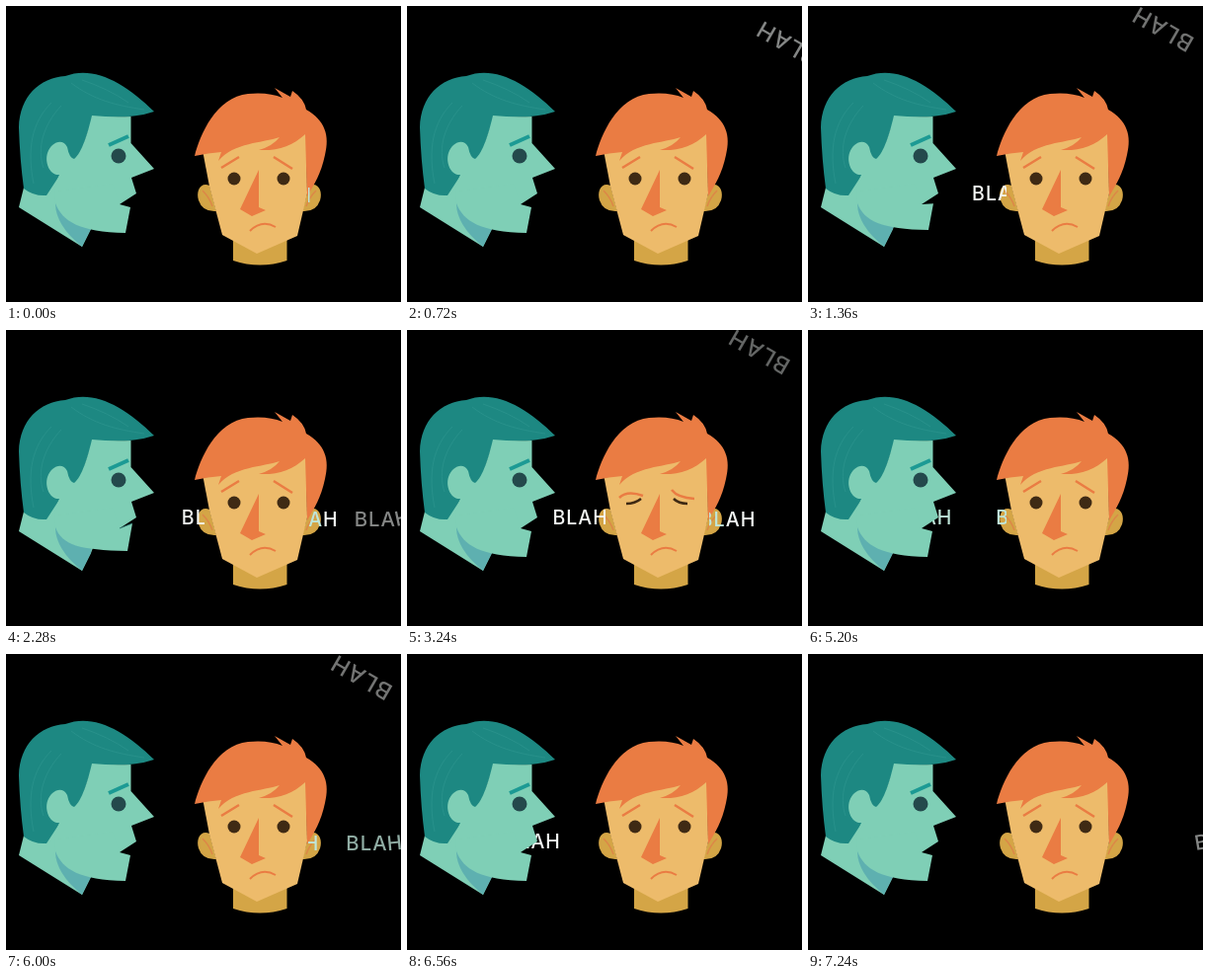
These frames come from a looping animation (400x300 px, 7.32 s). An HTML page with a canvas:

```html
<!DOCTYPE html>
<html lang="en">
<head>
<meta charset="utf-8">
<title>In one ear</title>
<style>
html, body { margin: 0; width: 100%; height: 100%; overflow: hidden; background: #000; }
canvas { display: block; width: 400px; height: 300px; }
</style>
</head>
<body>
<canvas id="stage" width="400" height="300"></canvas>
<script>
const ctx = document.getElementById('stage').getContext('2d');
const LOOP = 7320;
const TEAL = '#1d8882', MINT = '#7fcfb6', SHADE = '#5eb0b0';
const ORANGE = '#ea7c43', SKIN = '#edbb6b', TAN = '#d4a546', DARK = '#3f2a14';
const WHITE = '#f4f7f5', PALE = '#bfe6da';
const FONT = '500 19.5px Inter, "Open Sans", sans-serif';

const clamp = v => Math.max(0, Math.min(1, v));
const ramp = (v, a, b) => clamp((v - a) / (b - a));
const mix = (a, b, k) => a + (b - a) * k;

function fill(color, d) {
  ctx.fillStyle = color;
  ctx.fill(new Path2D(d));
}

function line(color, width, d) {
  ctx.strokeStyle = color;
  ctx.lineWidth = width;
  ctx.stroke(new Path2D(d));
}

function dot(color, x, y, r) {
  ctx.fillStyle = color;
  ctx.beginPath();
  ctx.arc(x, y, r, 0, Math.PI * 2);
  ctx.fill();
}

// ---- words -------------------------------------------------------------
// leave: time at the mouth, out: time at the far ear, speed: px per ms after it
const words = [
  { leave: 6480, out: 7318, speed: 0.2853, color: WHITE },
  { leave: 1018, out: 1943, speed: 0.302, color: WHITE },
  { leave: 1370, out: 2185, speed: 0.285, color: WHITE },
  { leave: 1700, out: 3064, speed: 0.25, color: WHITE },
  { leave: 2851, out: 4206, speed: 0.285, color: WHITE },
  { leave: 4152, out: 4640, speed: 0.2853, color: WHITE },
  { leave: 4750, out: 5673, speed: 0.285, color: PALE },
  { leave: 5150, out: 5978, speed: 0.35, color: PALE },
  { leave: 6040, out: 6710, speed: 0.27, color: WHITE }
];
const MOUTH = 129, EAR = 309, TOP = 697;
const BEND = 386.5, RADIUS = 78.6, TURN = Math.PI * 5 / 6, BASE = 199;

// Straight out of the ear, round the bend, then back up to the left.
function onPath(s) {
  if (s <= BEND) return { x: s, y: mix(197, BASE, ramp(s, 200, EAR)), a: 0 };
  const turn = Math.min((s - BEND) / RADIUS, TURN);
  const rest = s - BEND - turn * RADIUS;
  return {
    x: BEND + RADIUS * Math.sin(turn) + rest * Math.cos(turn),
    y: BASE - RADIUS * (1 - Math.cos(turn)) - rest * Math.sin(turn),
    a: -turn
  };
}

function wordHead(w, age) {
  const span = w.out - w.leave;
  if (age < span) return MOUTH + (EAR - MOUTH) * (1 - Math.pow(1 - age / span, 1.57));
  return EAR + (age - span) * w.speed;
}

function drawWord(head, color) {
  const scale = 1 + 0.2 * ramp(head, 330, TOP);
  const alpha = mix(1, 0.54, ramp(head, 392, 411)) * (1 - ramp(head, 693, 725));
  if (alpha <= 0) return;
  let s = head;
  ctx.globalAlpha = alpha;
  for (const ch of 'HALB') {
    const wide = (ctx.measureText(ch).width + 1) * scale;
    const p = onPath(s - wide / 2);
    ctx.save();
    ctx.translate(p.x, p.y);
    ctx.rotate(p.a);
    ctx.scale(scale, scale);
    ctx.fillStyle = p.x > 300 && p.x < 320 && p.a === 0 ? PALE : color;
    ctx.fillText(ch, 0, 0);
    ctx.restore();
    s -= wide;
  }
  ctx.globalAlpha = 1;
}

function drawWords(t) {
  ctx.save();
  ctx.beginPath();
  ctx.rect(60, 0, 141, 300);
  ctx.rect(306, 0, 94, 300);
  ctx.clip();
  ctx.font = FONT;
  ctx.textAlign = 'center';
  for (const w of words) {
    const age = (t - w.leave + LOOP) % LOOP;
    const head = wordHead(w, age);
    if (head < 730) drawWord(head, w.color);
  }
  ctx.restore();
}

// ---- talker ------------------------------------------------------------
function openness(t) {
  const p = t / LOOP * 18 % 1;
  if (p < 0.2) return 1;
  if (p < 0.5) return 1 - ramp(p, 0.2, 0.5);
  return ramp(p, 0.62, 0.72);
}

function drawTalker(t) {
  const open = openness(t);
  const lipX = mix(128, 126, open), lipY = mix(196, 204, open);
  const chinX = mix(123, 121, open), chinY = mix(224, 230, open);

  fill(MINT, 'M18 184 L13 204 L77 244 L86 226 L100 190 L60 160 Z');
  fill(SHADE, 'M50 200 Q50 222 77 244 L86 226 L88 205 Z');
  fill(TEAL, 'M13 123 C14 91 34 73 60 71 C88 60 120 77 150 107 Q127 115 88 112 ' +
    'L74 156 L54 172 L41 192 Q28 193 18 185 Q14 155 13 123 Z');
  line('#2b938d', 0.8, 'M46 98 C26 118 21 145 28 180 M56 101 C38 120 31 144 38 164 ' +
    'M66 78 C88 95 112 101 140 105 M77 75 Q104 84 124 98');

  // face with the ear, upper lip included
  fill(MINT, 'M87 111 Q107 113 126.5 112 L126.5 139 L150 165 L127 174 L132 190 L115 201 ' +
    'L100 212 L50 200 L49 183 L54 171 C44 172 39 158 42 149 C46 137 58 134 62 143 ' +
    'Q64 154 69 155 C77 149 83 128 87 111 Z');
  fill(MINT, `M49 188 L50 200 C57 218 74 ${chinY - 1} ${chinX} ${chinY} ` +
    `L${lipX} ${lipY} L115 201 L108 180 Z`);
  if (open < 0.5) line('#2c7772', 0.8, `M115 201 L${lipX} ${lipY}`);

  line('#1c9a94', 4, 'M104 141 L124 132');
  dot('#24494c', 114, 152, 7.5);
}

// ---- listener ----------------------------------------------------------
function drawListener(t) {
  fill(TAN, 'M230 230 H284.5 V258 Q257 267 230 258 Z');
  fill(TAN, 'M206 182 C197 178 192 188 195 197 Q199 209 213 208 Z');
  fill(TAN, 'M307 182 C316 178 321 188 318 197 Q314 209 300 208 Z');
  line('#dd8748', 1.5, 'M199 187 Q206 194 209 203 M314 187 Q307 194 304 203');
  fill(SKIN, 'M199 146 L240 115 L304 120 L305 190 L295 233 L254 251 L219 232 L206 183 Z');
  fill(ORANGE, 'M191 152 C196 131 213 92 245 89 Q266 87 280 93 L272 83 L288 92 L290 86 ' +
    'Q302 94 304 105 C323 116 328 131 323 151 C319 170 312 181 305 193 L303 130 ' +
    'C290 142 275 147 256 146 Q270 142 277 133 C260 139 231 138 215 157 L218 148 Q205 149 191 152 Z');
  fill(ORANGE, 'M256 166 L256 204 L263 207 L249 213 L237 206 Z');
  line(ORANGE, 2, 'M247 228 Q259 216 273 224');

  const shut = t >= 3140 && t < 3340;
  if (shut) {
    line(ORANGE, 2.5, 'M215 170 Q223 162 239 168 M268 162 Q274 170 291 171');
    line(DARK, 2.5, 'M222 176 Q231 176 237 171 M270 171 Q275 176 284 176');
  } else {
    line(ORANGE, 2.5, 'M218 164 L236 153 M271 153 L290 165');
    dot(DARK, 231, 175, 6.5);
    dot(DARK, 281, 175, 6.5);
  }
}

function draw(t) {
  ctx.fillStyle = '#000';
  ctx.fillRect(0, 0, 400, 300);
  drawListener(t);
  drawWords(t);
  drawTalker(t);
}

const start = performance.now();
function tick(now) {
  const t = Math.max(0, now - start) % LOOP;
  draw(Math.floor(t / 40) * 40);
  requestAnimationFrame(tick);
}
draw(0);
requestAnimationFrame(tick);
</script>
</body>
</html>
```
